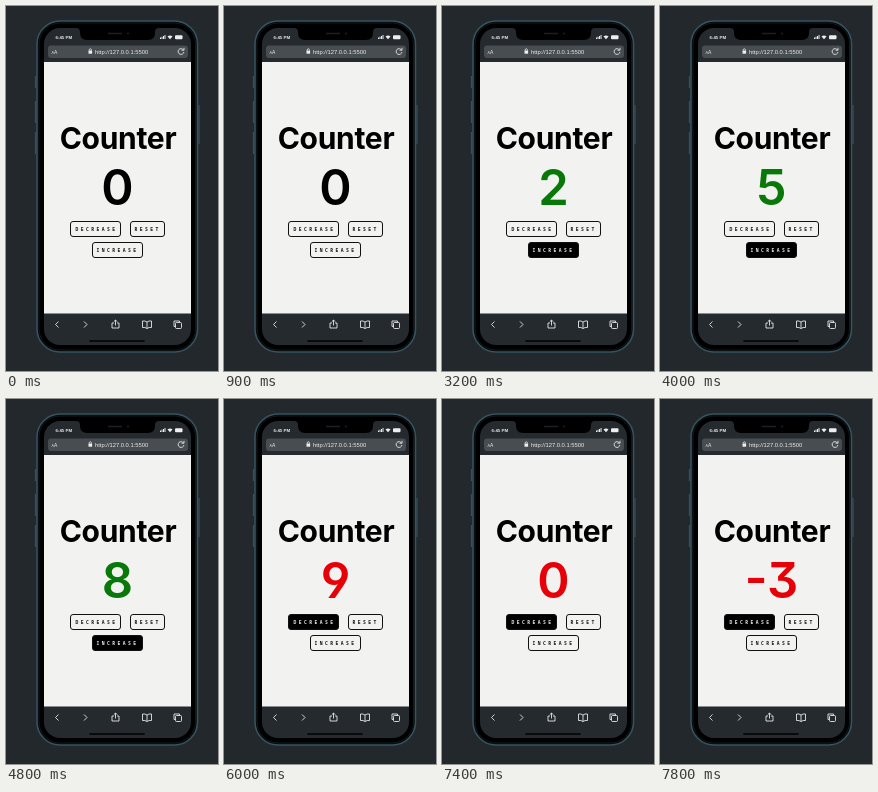
Write an HTML page that moves like this. It is 212 px wide and 365 px high and loops after 8 s.

```html
<!DOCTYPE html>
<html lang="en">
<head>
<meta charset="utf-8">
<title>Counter</title>
<style>
html, body { margin: 0; width: 100%; height: 100%; overflow: hidden; background: #22282c; }
svg { display: block; width: 100vw; height: 100vh; }
.big { font-family: Inter, sans-serif; text-anchor: middle; }
#title { font-size: 30px; font-weight: 700; letter-spacing: -.3px; }
/* open four, six and nine, flat-top three */
#count { font-size: 49px; font-weight: 600; font-feature-settings: "cv02", "cv03", "cv04", "cv09"; }
.tiny { font-family: "Liberation Sans", sans-serif; fill: #eee; }
.btn rect { fill: #f2f2f1; stroke: #111; }
.btn text { font: 700 4.7px "Noto Sans Mono", monospace; letter-spacing: 2.45px; fill: #111; }
.btn.on rect { fill: #000; }
.btn.on text { fill: #eee; }
.icon { fill: none; stroke: #e4e6e8; stroke-width: .9; }
</style>
</head>
<body>
<svg viewBox="0 0 212 365">
  <rect width="212" height="365" fill="#22282c"/>

  <!-- phone body -->
  <path d="M29.500 70v12M29.500 95v22M29.500 126v22M193 99v39" stroke="#34505c" stroke-width="1.3"/>
  <rect x="31" y="15" width="160.500" height="331" rx="23" fill="#060809" stroke="#36535f" stroke-width="1.6"/>
  <rect x="33" y="17" width="156.500" height="327" rx="21" fill="#000" stroke="#10191d"/>

  <!-- screen -->
  <clipPath id="screen"><rect x="38" y="22" width="147" height="317" rx="16"/></clipPath>
  <g clip-path="url(#screen)">
    <rect x="38" y="22" width="147" height="317" fill="#252a2f"/>
    <rect x="38" y="56" width="147" height="251.500" fill="#f2f2f1"/>
    <rect x="42" y="39.500" width="140" height="12.500" rx="3" fill="#484d51"/>
    <path d="M70 22h83q-4 0-4 4v1q0 7-7 7H81q-7 0-7-7v-1q0-4-4-4z" fill="#000"/>
    <path d="M102 27.500h14M121 27.500h2" stroke="#1c2023" stroke-width="1.500"/>
  </g>

  <!-- status and address bars -->
  <text class="tiny" x="49.500" y="33" font-size="4.400" font-weight="700">6:45 PM</text>
  <path d="M154.500 33v-1.500M156 33v-2.300M157.500 33v-3M159 33v-4" stroke="#eee"/>
  <path d="M161.500 30.500q2.500-2 5 0l-2.500 2.700z" fill="#eee"/>
  <rect x="169" y="29.200" width="7.500" height="4" rx="1" fill="#eee"/>
  <text class="tiny" x="45.500" y="47.500" font-size="5">ᴀA</text>
  <rect x="82.500" y="44.500" width="3.600" height="3.200" fill="#eee"/>
  <path class="icon" d="M83.200 44.500v-1q1.100-1.500 2.200 0v1" stroke-width=".7"/>
  <text class="tiny" x="89" y="47.500" font-size="5.800">http://127.0.0.1:5500</text>
  <path class="icon" d="M177.500 44a2.900 2.900 0 1 0 .4 2M178 41.800v2.400h-2.500"/>

  <!-- page -->
  <text class="big" id="title" x="112" y="142.500">Counter</text>
  <text class="big" id="count" x="111.500" y="198.700"></text>
  <g class="btn"><rect x="64.500" y="215.500" width="50" height="15" rx="2.500"/><text x="69.500" y="225">DECREASE</text></g>
  <g class="btn"><rect x="124.500" y="215.500" width="34" height="15" rx="2.500"/><text x="128.500" y="225">RESET</text></g>
  <g class="btn"><rect x="86.500" y="236.500" width="50" height="15" rx="2.500"/><text x="90.500" y="245.500">INCREASE</text></g>

  <!-- toolbar -->
  <g class="icon">
    <path d="M52.500 315.500l-3 3 3 3M78 315.500l3 3-3 3"/>
    <path d="M108 317h-2v5h7v-5h-2M109.500 319.500v-5.500m-1.700 1.700l1.700-1.700 1.700 1.700"/>
    <path d="M141 316q-2-1.500-4.500-1v6.500q2.500-.5 4.500 1 2-1.500 4.500-1V315q-2.500-.5-4.500 1v6.500"/>
    <path d="M169.500 320.500h-1.500v-5.500h5.500v1.500"/><rect x="169.500" y="316.500" width="6" height="6" rx="1"/>
  </g>
  <path d="M84 335h54" stroke="#000" stroke-width="1.600" stroke-linecap="round"/>
</svg>
<script>
const LOOP = 8000;
const clicksUp = [2700, 3200, 3400, 3600, 4000, 4300, 4500, 4700, 5000, 5200];
const clicksDown = [6000, 6100, 6300, 6500, 6600, 6800, 6900, 7100, 7200, 7400, 7500, 7700, 7800];
const [decrease, reset, increase] = document.querySelectorAll('.btn');
const count = document.getElementById('count');

function draw(t) {
  const done = list => list.filter(c => c <= t).length;
  const up = done(clicksUp), down = done(clicksDown);
  count.textContent = up - down;
  count.style.fill = down ? '#e60008' : up ? '#087808' : '#000';
  const hover = (button, from, to) => button.classList.toggle('on', t >= from && t < to);
  hover(reset, 1300, 2100);
  hover(increase, 2200, 5400);
  hover(decrease, 5400, LOOP);
}

const start = performance.now();
function tick() {
  draw((performance.now() - start) % LOOP);
  requestAnimationFrame(tick);
}
tick();
</script>
</body>
</html>
```
